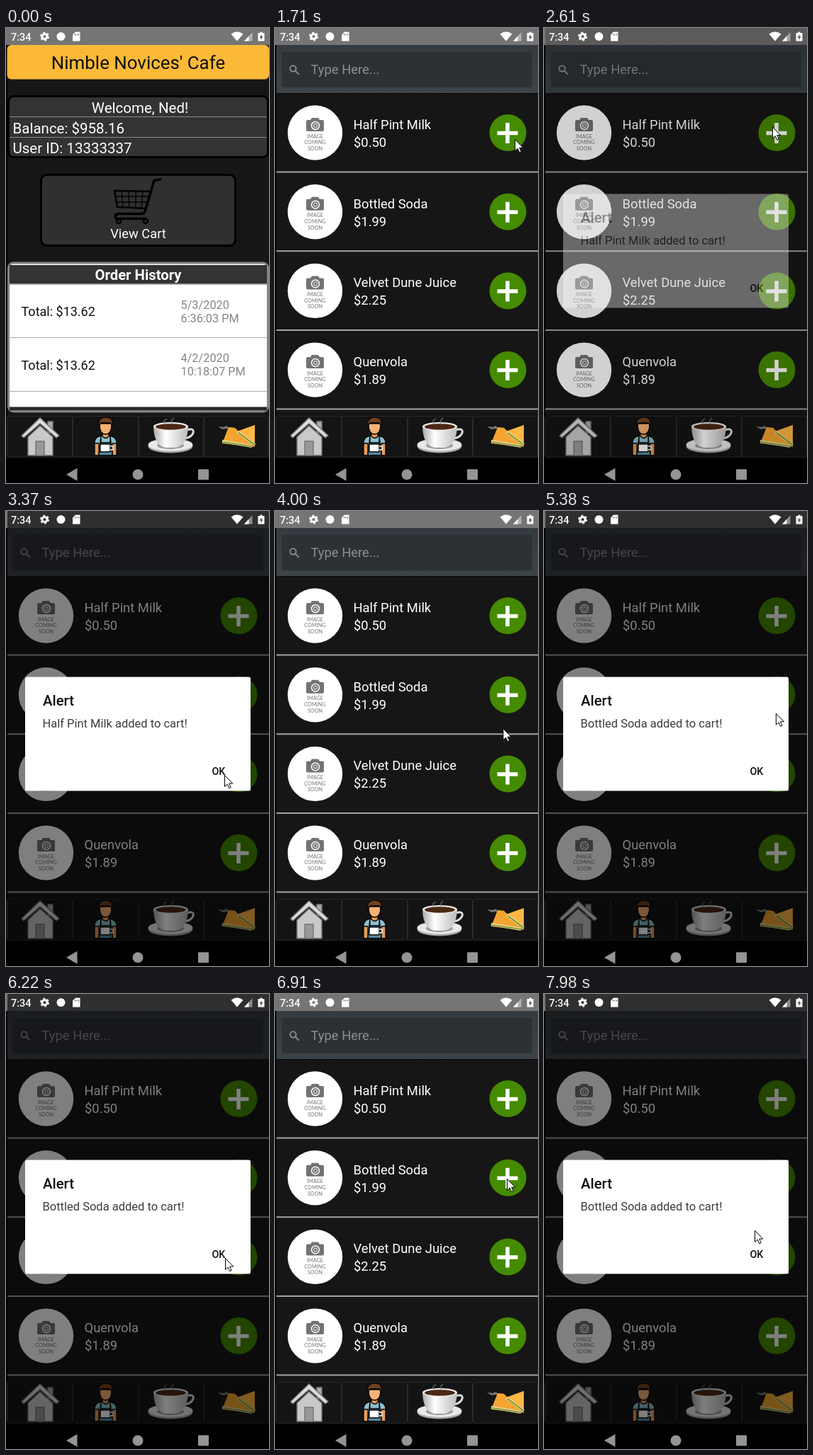
These frames come from a looping animation (371x643 px, 8 s). An HTML page:

```html
<!DOCTYPE html>
<html lang="en">
<head>
<meta charset="utf-8">
<title>Cafe app</title>
<style>
html, body { margin: 0; width: 100%; height: 100%; overflow: hidden; background: #000; }
svg { display: block; width: 371px; height: 643px; font-family: Roboto, sans-serif; }
.mid { text-anchor: middle; }
.medium { font-weight: 500; }
</style>
</head>
<body>
<svg id="stage" viewBox="0 0 371 643">
  <defs>
    <linearGradient id="bar" x2="0" y2="1">
      <stop stop-color="#353b40"/><stop offset="1" stop-color="#3c4448"/>
    </linearGradient>
    <linearGradient id="cup">
      <stop stop-color="#aaa"/><stop offset=".35" stop-color="#fff"/><stop offset="1" stop-color="#bbb"/>
    </linearGradient>
    <clipPath id="listClip"><path d="M2 24h369v523H2z"/></clipPath>
  </defs>
  <path d="M2 24h369v583H2z" fill="#161616"/>

  <g id="home" fill="#fff">
    <rect x="1.5" y="24" width="369.5" height="48.500" rx="6" fill="#fbb937"/>
    <text class="mid" x="186.500" y="58" font-size="25.900" fill="#111">Nimble Novices' Cafe</text>
    <rect x="3.500" y="96.500" width="366" height="86" rx="7" fill="#333" stroke="#000" stroke-width="3"/>
    <path d="M5 125.500h363M5 154.500h363" stroke="#8a8a8a"/>
    <g font-size="20.500">
      <text class="mid" x="189" y="120">Welcome, Ned!</text>
      <text x="9.500" y="149">Balance: $958.16</text>
      <text x="9.500" y="177">User ID: 13333337</text>
    </g>
    <rect x="49.500" y="207.500" width="274" height="100" rx="8" fill="#303030" stroke="#000" stroke-width="3"/>
    <g fill="none" stroke="#000" stroke-width="3.500" stroke-linejoin="round">
      <path d="M219 213.500l-10 2-13 44q-1 3-5 3h-31q-6 0-6 4t6 3h38"/>
      <path d="M205 231l-52-1 4 23 40 2" stroke-width="2.500"/>
      <path d="M163 230l2 24M173 230l1 24M183 231v24M193 231l-2 24M154 238h49M156 246h44" stroke-width="1.300"/>
      <g stroke-width="2.500"><circle cx="159" cy="273" r="3"/><circle cx="197" cy="273" r="3"/></g>
    </g>
    <text class="mid" x="186.500" y="297" font-size="18.300">View Cart</text>
    <rect x="3.500" y="332" width="366" height="210" rx="7" stroke="#858585" stroke-width="3"/>
    <path d="M5 335h363v26.500H5z" fill="#333"/>
    <path d="M5 362.500h363M5 437.500h363M5 513.500h363" stroke="#aaa"/>
    <path d="M5 535.500h363v5H5z" fill="#242a26"/>
    <text class="mid" x="186.500" y="356" font-size="20.300" font-weight="700">Order History</text>
    <g font-size="18" fill="#111"><text x="21.500" y="407">Total: $13.62</text><text x="21.500" y="482.500">Total: $13.62</text></g>
    <g font-size="16.300" fill="#858585">
      <text x="246.500" y="397">5/3/2020</text><text x="246.500" y="416">6:36:03 PM</text>
      <text x="246.500" y="472">4/2/2020</text><text x="246.500" y="491">10:18:07 PM</text>
    </g>
  </g>

  <g id="list" clip-path="url(#listClip)">
    <path d="M2 24h369v68H2z" fill="url(#bar)"/>
    <path d="M2 92.500h369" stroke="#050505"/>
    <rect x="9.500" y="33.500" width="353" height="50.500" rx="3" fill="#2d3136"/>
    <g fill="none" stroke="#8b8e91" stroke-width="1.900"><circle cx="25.500" cy="57.300" r="4.200"/><path d="M28.600 60.400l5.200 5.200"/></g>
    <text x="50.500" y="65" font-size="18.400" fill="#8b8e91">Type Here...</text>
  </g>

  <g id="tabs">
    <path d="M2 547h369v60H2z" fill="#111"/>
    <g fill="#141414" stroke="#2a2a2a">
      <rect x="1.500" y="548.500" width="92" height="58" rx="2"/><rect x="94.500" y="548.500" width="92" height="58" rx="2"/>
      <rect x="187.500" y="548.500" width="91" height="58" rx="2"/><rect x="279.500" y="548.500" width="91" height="58" rx="2"/>
    </g>
    <g stroke="#777" stroke-width="1.500" stroke-linejoin="round">
      <path d="M59 556h7v16h-7z" fill="#aaa"/>
      <path d="M31 578l17-16 18 16v26H31z" fill="#c9c9c9"/>
      <path d="M48 551l27 25-4 3-23-20-23 20-3-3z" fill="#ddd"/>
      <path d="M42 584h12v20H42z" fill="#999"/>
    </g>
    <g stroke="#050505" stroke-width="1.300" stroke-linejoin="round">
      <path d="M125 604v-19q1-8 10-9h10q10 1 11 9v19z" fill="#8dbfcd"/>
      <path d="M125 587h6v17h-6zM150 587h6v17h-6z" fill="#e69a58"/>
      <path d="M134 576v10h13v-10l3 28h-19z" fill="#538da4"/>
      <path d="M136 570h9v7q-4 5-9 0z" fill="#e69a58"/>
      <path d="M132 559q0 15 8.500 15t8.500-15z" fill="#f6b173"/>
      <path d="M131 563v-7q2-6 10-6 9 0 9 7v6l-3-5h-13z" fill="#70401f"/>
      <path d="M133 588h14v11h-14z" fill="#fff"/><path d="M147 591h4v5h-4" fill="none" stroke="#fff"/>
    </g>
    <ellipse cx="232" cy="591" rx="31.500" ry="9.500" fill="#aaa"/>
    <ellipse cx="232" cy="589" rx="31.500" ry="9" fill="#e8e8e8"/>
    <ellipse cx="232" cy="590" rx="19" ry="5" fill="#999"/>
    <path d="M255 568q11-3 9 4t-16 9" fill="none" stroke="#ddd" stroke-width="3"/>
    <path d="M208 563q1 28 17 30h14q17-3 18-30z" fill="url(#cup)"/>
    <ellipse cx="232.500" cy="563" rx="24.500" ry="6" fill="#eee"/>
    <ellipse cx="232.500" cy="563.500" rx="21.500" ry="4.300" fill="#4a2814"/>
    <path d="M225 560q-5-4 2-8M235 560q-4-4 2-9" fill="none" stroke="#888" stroke-opacity=".5" stroke-width="2"/>
    <path d="M299 563l8 1 5-2 2 4-9 1z" fill="#777"/>
    <path d="M314 564l-9 23 45 5-27-27z" fill="#f4a52f"/>
    <path d="M326 570l25-9v31z" fill="#ffb743"/>
    <path d="M305 584l42 7M327 571l24 18" fill="none" stroke="#efd29a" stroke-width="4"/>
    <path d="M306 585l41 6M328 572l23 17" fill="none" stroke="#6a9a27" stroke-width="1.600"/>
  </g>

  <path id="dim" d="M2 24h369v583H2z"/>
  <path d="M0 0h371v24H0z" fill="#757575"/>
  <path id="statusDim" d="M2 0h369v24H2z"/>
  <g fill="#fff">
    <text class="medium" x="7" y="17.500" font-size="14.500">7:34</text>
    <circle cx="54.500" cy="12" r="3.600" fill="none" stroke="#fff" stroke-width="3"/>
    <circle cx="54.500" cy="12" r="5.500" fill="none" stroke="#fff" stroke-width="2" stroke-dasharray="2.900 2.860"/>
    <circle cx="77.500" cy="12" r="6"/>
    <path d="M98 5.500h6.500v13H94V9.500z"/>
    <path d="M97.500 8v2.500M100 8v2.500M102.500 8v2.500" stroke="#666"/>
    <path d="M317.500 8.500q8.500-6.500 17 0L326 18.500z"/>
    <path d="M347.500 6v12.500H336z" opacity=".45"/><path d="M342.500 11.500v7H336z"/>
    <path d="M358.500 5.500h3v1.500h3v11.500h-9V7h3z"/>
    <path d="M360.500 9l-3 4.500h2v3.500l3-5h-2z" fill="#555"/>
  </g>

  <path d="M0 607h371v36H0z"/>
  <g fill="#949494"><path d="M85 631l15.500-9v18z"/><circle cx="186" cy="631" r="7.500"/><rect x="271" y="623.500" width="15" height="15" rx="1"/></g>

  <g id="alert">
    <rect x="27" y="234.500" width="318" height="161" rx="2.500" fill="#fff"/>
    <text class="medium" x="52" y="275" font-size="20.300" fill="#111">Alert</text>
    <text id="message" x="51.500" y="306" font-size="16.500" fill="#3c3c3c"></text>
    <text class="medium" x="290.500" y="372.500" font-size="14.300" fill="#111">OK</text>
  </g>
  <path id="cursor" d="M.5 .5v16l3.700-3.400 2.500 5.600 2.500-1.100-2.500-5.500h5z" fill="#fff" stroke="#000"/>
</svg>
<script>
const $ = id => document.getElementById(id);

const items = [["Half Pint Milk", "0.50"], ["Bottled Soda", "1.99"], ["Velvet Dune Juice", "2.25"], ["Quenvola", "1.89"]];
$("list").innerHTML += items.map(([name, price], i) => `
  <g transform="translate(0 ${i * 111.7})">
    <path d="M2 203.500h369" stroke="#a3a3a3" stroke-width="2"/>
    <circle cx="56.500" cy="148" r="38.700" fill="#fff"/>
    <path d="M46 130h4l2-3h9l2 3h4q2 0 2 2v12q0 2-2 2H46q-2 0-2-2v-12q0-2 2-2z" fill="#737373"/>
    <circle cx="57" cy="138" r="5.500" fill="#737373" stroke="#fff" stroke-width="1.500"/>
    <circle cx="57" cy="138" r="2.500" fill="none" stroke="#fff"/>
    <g class="mid" font-family="Lato, sans-serif" font-size="7.300" fill="#777">
      <text x="56.500" y="155.500">IMAGE</text><text x="56.500" y="164.200">COMING</text><text x="56.500" y="173">SOON</text>
    </g>
    <g font-size="18.400" fill="#fff"><text x="110.500" y="143">${name}</text><text x="111" y="168">$${price}</text></g>
    <g id="add${i}"><circle cx="328.500" cy="148" r="26" fill="#458b00"/>
      <path d="M313.500 148.500h29M328 134v29" stroke="#fff" stroke-width="5.500"/></g>
  </g>`).join("");

// Linear interpolation through [time, ...values] keys.
function track(keys, t) {
  const n = keys.findIndex(k => k[0] > t);
  if (n < 1) return keys.at(n).slice(1);
  const [a, b] = [keys[n - 1], keys[n]], p = (t - a[0]) / (b[0] - a[0]);
  return a.slice(1).map((v, i) => v + (b[i + 1] - v) * p);
}

const path = [
  [70, 232, 660], [420, 226, 588], [560, 218, 582], [870, 210, 583], [1000, 216, 570],
  [1500, 325, 215], [1710, 338, 157], [1790, 350, 172], [1870, 359, 185], [1940, 340, 160], [2000, 322, 139],
  [2610, 322, 139], [3150, 307, 365], [3370, 308, 373], [3680, 308, 373], [4230, 331, 260],
  [4600, 334, 256], [4840, 333, 254], [5220, 333, 254], [5800, 311, 368], [5990, 309, 373],
  [6350, 309, 373], [6830, 327, 262], [6910, 327, 261], [7200, 328, 256], [7700, 328, 256], [7980, 297, 334]
];
const shown = [[2560, 0], [2700, 1], [3600, 1], [3750, 0], [5170, 0], [5310, 1], [6330, 1], [6480, 0], [7320, 0], [7460, 1]];
const press = (down, up) => [[down, 1], [down + 70, .35], [up, .35], [up + 130, 1]];
const firstPress = press(2070, 2330);
const secondPress = [...press(4650, 4930), ...press(7000, 7160)];

function draw() {
  const t = performance.now() % 8000, [k] = track(shown, t), [x, y] = track(path, t);
  $("home").style.display = t < 720 ? "" : "none";
  $("list").style.display = t < 720 ? "none" : "";
  $("add0").style.opacity = track(firstPress, t)[0];
  $("add1").style.opacity = track(secondPress, t)[0];
  $("dim").style.opacity = k * .5;
  $("statusDim").style.opacity = k * .6;
  $("alert").style.opacity = k;
  $("message").textContent = items[t < 4500 ? 0 : 1][0] + " added to cart!";
  $("cursor").setAttribute("transform", `translate(${x} ${y})`);
  requestAnimationFrame(draw);
}
draw();
</script>
</body>
</html>
```
